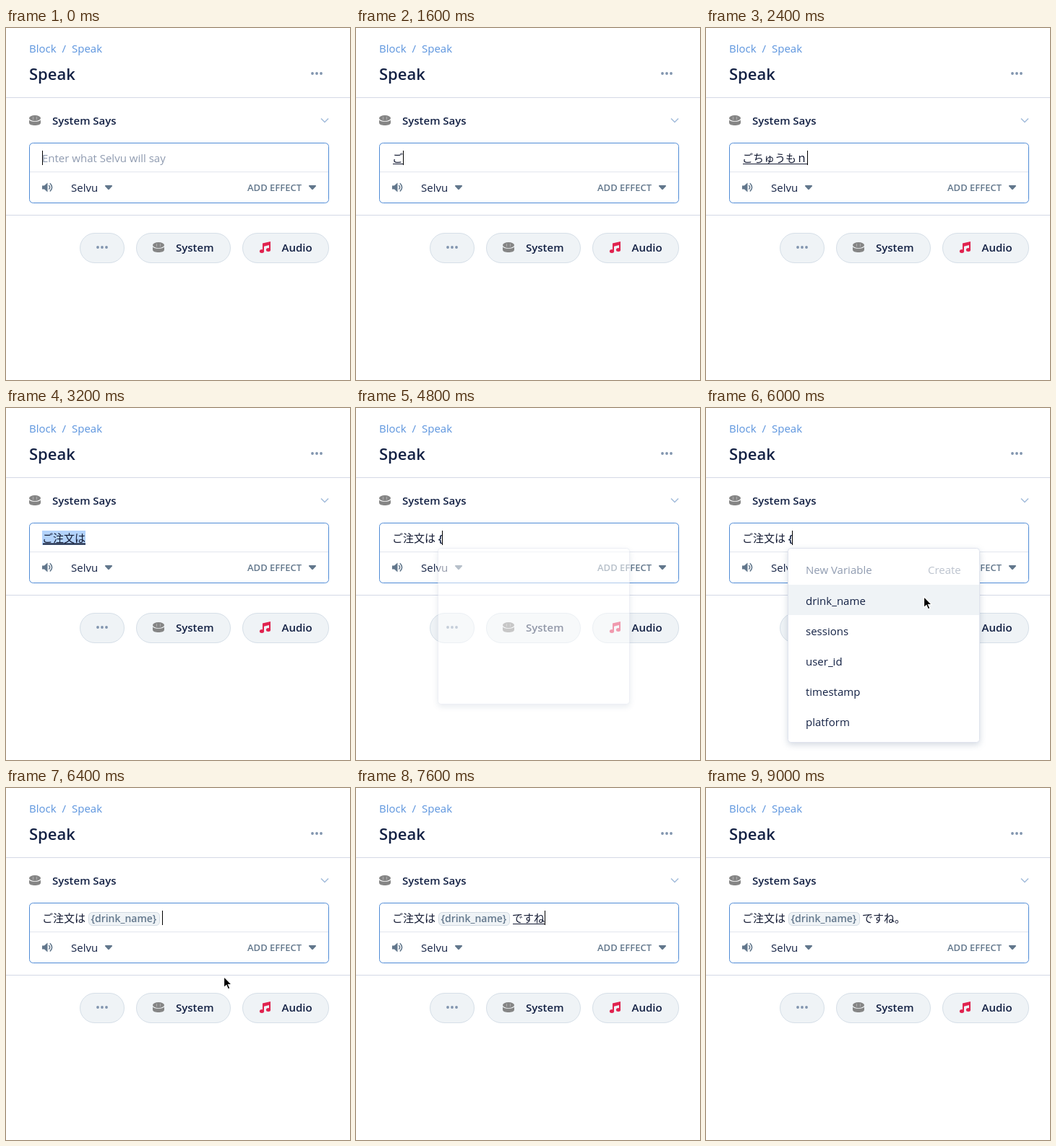
Animation, 476 px wide and 488 px high, one loop 9200 ms. Source, as an HTML page:

```html
<!DOCTYPE html>
<html lang="en">
<head>
<meta charset="utf-8">
<title>Speak block</title>
<style>
  html, body { margin: 0; width: 100%; height: 100%; overflow: hidden; background: #fff; }
  svg { display: block; }
  text { font: 400 15px "Open Sans", "Noto Sans CJK JP", "Noto Sans CJK", sans-serif; fill: #132144; white-space: pre; }
  .semi { font-weight: 600; }
  .title { font-size: 22px; }
  .link { fill: #5b94de; }
  .hint { fill: #8f9bb0; }
  .kana { font-family: "Noto Sans CJK JP", "Noto Sans CJK", sans-serif; fill: #131a33; }
  .action { font-size: 13px; fill: #62778c; }
  .chip { font-size: 14px; fill: #62778c; }
  .create { fill: #bcc3ce; }
  .line { fill: #d4d9e6; }
  .pill { fill: #eff3f6; stroke: #d6dfe8; }
  .slate { fill: #62778c; }
  .dots { fill: #8094ae; }
  #panel { fill: #fff; stroke: #dfe3ed; filter: drop-shadow(0 3px 4px rgba(17, 49, 96, .18)); }
</style>
</head>
<body>
<svg width="476" height="488" viewBox="0 0 476 488">
  <defs>
    <g id="disc">
      <ellipse cx="8" cy="4" rx="8" ry="4" fill="#858585"/>
      <path d="M0 6.4C2 9.6 14 9.6 16 6.4V10.5C16 15.2 0 15.2 0 10.5Z" fill="#858585"/>
      <path d="M5 3h1M10 3h1M5 5h1M10 5h1" stroke="#d8d8d8"/>
    </g>
    <g id="dots"><circle cx="-6" r="1.9"/><circle r="1.9"/><circle cx="6" r="1.9"/></g>
    <path id="drop" d="M-4.2 -3H4.2Q5.6 -2.8 4.8 -1.6L.9 2.8Q0 3.6 -.9 2.8L-4.8 -1.6Q-5.6 -2.8 -4.2 -3Z"/>
  </defs>

  <text class="link" x="32" y="34">Block</text>
  <text class="link" x="77.5" y="34">/</text>
  <text class="link" x="91" y="34">Speak</text>
  <text class="semi title" x="32" y="72">Speak</text>
  <use href="#dots" class="dots" x="430" y="63"/>
  <rect class="line" y="96" width="476" height="1"/>

  <use href="#disc" x="32" y="121"/>
  <text class="semi" x="64" y="134">System Says</text>
  <path d="M436 125.5L441 130.5L446 125.5" fill="none" stroke="#a3bcdb" stroke-width="1.5"/>

  <rect x="32.5" y="159.5" width="414" height="83" rx="5" fill="#fff" stroke="#4f8bd6"/>
  <rect x="33" y="199" width="413" height="1" fill="#e2e6ee"/>
  <g class="slate">
    <path d="M50 218.4h3l4.5-4v13l-4.5-4h-3z"/>
    <path d="M59.3 218q2.6 2.9 0 5.8M60.8 215.2q5.6 5.6 0 11.4" fill="none" stroke="#62778c" stroke-width="1.5"/>
    <use href="#drop" x="142" y="221"/>
    <use href="#drop" x="424" y="221"/>
  </g>
  <text x="90" y="227">Selvu</text>
  <text class="semi action" x="334" y="226">ADD EFFECT</text>
  <rect class="line" y="259" width="476" height="1"/>

  <rect class="pill" x="102.5" y="284.5" width="61" height="41" rx="20.5"/>
  <rect class="pill" x="180.5" y="284.5" width="130" height="41" rx="20.5"/>
  <rect class="pill" x="327.5" y="284.5" width="119" height="41" rx="20.5"/>
  <use href="#dots" class="dots" x="133" y="304"/>
  <use href="#disc" x="203" y="297"/>
  <text class="semi" x="235" y="309.5">System</text>
  <g fill="#e0234f">
    <path d="M355 298.6L366 296V307.5H364V301L357 302.7V309.5H355Z"/>
    <ellipse cx="354" cy="309.5" rx="3.1" ry="2.5"/>
    <ellipse cx="363" cy="307.5" rx="3.1" ry="2.5"/>
  </g>
  <text class="semi" x="381.5" y="309.5">Audio</text>

  <text id="hint" class="hint" x="50" y="186">Enter what Selvu will say</text>
  <rect id="mark" y="170" height="20" fill="#b3d3fb"/>
  <text id="head" class="kana" x="50" y="186"></text>
  <text id="brace" class="semi" x="113.7" y="186">{</text>
  <g id="chip">
    <rect x="114.5" y="172.5" width="98" height="18" rx="5" fill="#eff3f6" stroke="#d3dbe3"/>
    <text class="semi chip" x="117.5" y="186">{drink_name}</text>
  </g>
  <text id="tail" class="kana" x="216" y="186"></text>
  <rect id="rule" fill="#131a33"/>
  <rect id="caret" y="170" width="1" height="20" fill="#000"/>

  <g id="popup">
    <rect id="panel" x="113.5" y="194.5" width="265" rx="4"/>
    <g id="rows">
      <rect id="hover" x="114" width="264" height="42" fill="#eff3f6"/>
      <text class="hint" x="138" y="230">New Variable</text>
      <text class="create" x="307" y="230">Create</text>
    </g>
  </g>
  <path id="mouse" d="M0 0V15.2L3.5 12L5.9 17.4L8.5 16.3L6.1 11.1H10.8Z" fill="#000" stroke="#fff" stroke-width="1.2"/>
</svg>

<script>
const LOOP = 9200, EM = 15, ROW = 42, TOP = 203;
const $ = id => document.getElementById(id);
const set = (id, attrs) => { for (const k in attrs) $(id).setAttribute(k, attrs[k]); };
const show = (id, on) => set(id, { visibility: on ? 'visible' : 'hidden' });

['drink_name', 'sessions', 'user_id', 'timestamp', 'platform'].forEach((name, i) => {
  const row = document.createElementNS('http://www.w3.org/2000/svg', 'text');
  row.textContent = name;
  $('rows').append(row);
  set('rows', {});
  row.setAttribute('x', 138);
  row.setAttribute('y', 273 + i * ROW);
});

// Each step changes only the fields it names.
// ime: 0 plain, 1 composing, 2 converted; popup: 0 closed, 1 opening, 2 open
const start = { head: '', tail: '', ime: 0, caret: 50, brace: 0, chip: 0, popup: 0, hover: 0, mouse: null };
const steps = [
  [0, {}],
  [600, { caret: 0 }],
  [1000, { caret: 50 }],
  [1600, { head: 'ご', ime: 1, caret: 65 }],
  [1800, { head: 'ごちゅ', caret: 95 }],
  [2000, { head: 'ごちゅう', caret: 110 }],
  [2200, { head: 'ごちゅうｍ', caret: 125 }],
  [2400, { head: 'ごちゅうもｎ', caret: 140 }],
  [2600, { head: 'ごちゅうもんｈ', caret: 155 }],
  [2800, { head: 'ごちゅうもんは' }],
  [3200, { head: 'ご注文は', ime: 2, caret: 0 }],
  [3400, { ime: 0, caret: 110 }],
  [4000, { caret: 0 }],
  [4400, { caret: 114 }],
  [4600, { brace: 1, caret: 119 }],
  [4800, { popup: 1 }],
  [5000, { popup: 2 }],
  [5200, { caret: 0 }],
  [5600, { caret: 119, mouse: [435, 428] }],
  [5800, { hover: 1, mouse: [322, 285] }],
  [6000, { mouse: [301.5, 261.5] }],
  [6400, { popup: 0, brace: 0, chip: 1, caret: 216 }],
  [7000, { tail: 'で', ime: 1, caret: 231, mouse: null }],
  [7200, { tail: 'でｓ', caret: 246 }],
  [7400, { tail: 'です' }],
  [7600, { tail: 'ですね', caret: 261 }],
  [7800, { tail: 'ですね。', caret: 276 }],
  [8200, { ime: 2, caret: 0 }],
  [8400, { ime: 0, caret: 276 }],
  [9000, { caret: 0 }]
];
let last = start;
const states = steps.map(([at, change]) => (last = { ...last, ...change, at }));

function draw(s) {
  $('head').textContent = s.head;
  $('tail').textContent = s.tail;
  show('hint', !s.head);
  show('brace', s.brace);
  show('chip', s.chip);

  const x = s.tail ? 216 : 50;
  const w = (s.tail || s.head).length * EM;
  set('mark', { x, width: w });
  show('mark', s.ime === 2);
  set('rule', { x: x + 1, y: s.ime === 2 ? 187.5 : 188, width: Math.max(0, w - 1), height: s.ime === 2 ? 2 : 1 });
  show('rule', s.ime);

  set('caret', { x: s.caret });
  show('caret', s.caret);

  set('popup', { opacity: [0, .54, 1][s.popup] });
  set('panel', { height: s.popup === 1 ? 216 : 269 });
  set('hover', { y: TOP + s.hover * ROW });
  set('rows', { opacity: s.popup === 2 ? 1 : 0 });

  show('mouse', s.mouse);
  if (s.mouse) set('mouse', { transform: `translate(${s.mouse})` });
}

let shown = null;
const begin = performance.now();
function tick() {
  const t = (performance.now() - begin) % LOOP;
  const s = states.findLast(state => state.at <= t);
  if (s !== shown) draw(shown = s);
  requestAnimationFrame(tick);
}
tick();
</script>
</body>
</html>
```
